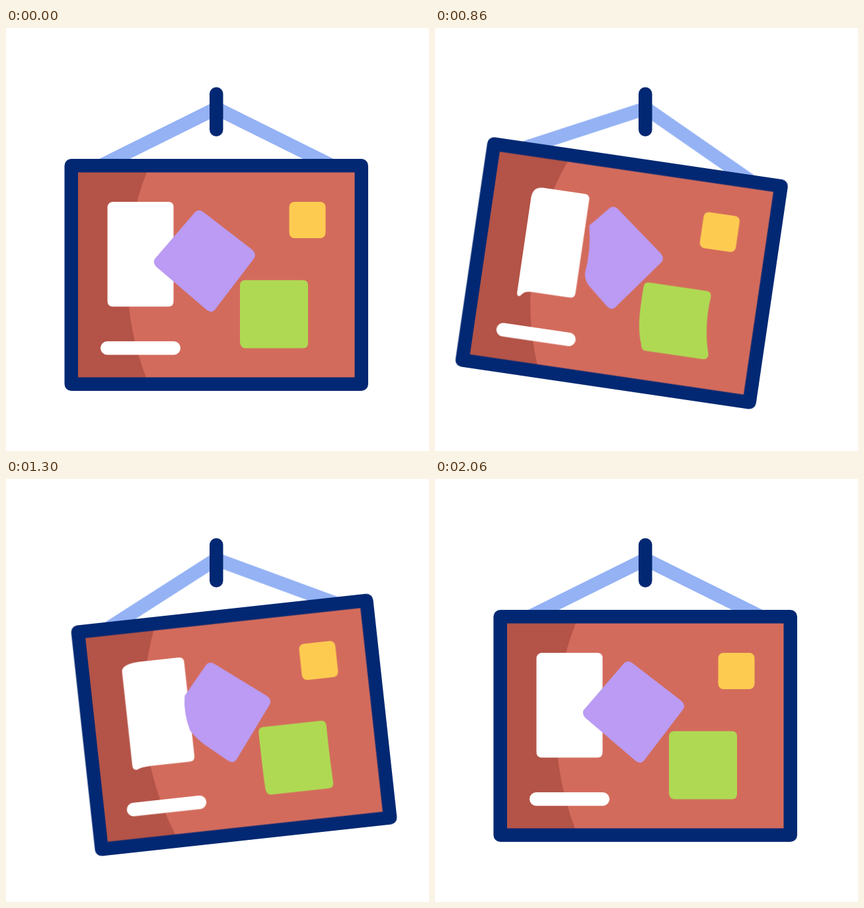
These frames come from a looping animation (640x640 px, 2.72 s). An HTML page:

```html
<!DOCTYPE html>
<html lang="en">
<head>
<meta charset="utf-8">
<title>Swinging pinboard</title>
<style>
  html, body { margin: 0; width: 100%; height: 100%; overflow: hidden; background: #fff; }
  svg { display: block; width: 100%; height: 100%; }

  #board {
    transform-origin: 318.3px 127px;
    animation: sway 2720ms infinite;
  }

  @keyframes sway {
    0%, 16.18% { transform: rotate(0deg); animation-timing-function: cubic-bezier(.333, 0, .667, 1); }
    22.83% { transform: rotate(-6.5deg); animation-timing-function: cubic-bezier(.333, 0, .333, 1); }
    35.85% { transform: rotate(10deg); animation-timing-function: cubic-bezier(.42, 0, .667, 1); }
    52.1% { transform: rotate(-10deg); animation-timing-function: cubic-bezier(.35, 0, .15, 1); }
    72.65%, 100% { transform: rotate(0deg); }
  }
</style>
</head>
<body>
<svg viewBox="0 0 640 640">
  <g id="board">
    <path d="M144 208L318.3 121.5L492.6 208" fill="none" stroke="#94b2f4" stroke-width="20.4"/>
    <rect x="98.75" y="208.25" width="439" height="330.5" fill="#d36b5c"/>
    <path d="M105 218H213A429 429 0 0 0 212 529H105Z" fill="#b45347"/>
    <rect x="98.75" y="208.25" width="439" height="330.5" fill="none"
          stroke="#022873" stroke-width="20.5" stroke-linejoin="round"/>
    <rect x="143" y="474" width="121" height="20.5" rx="10.25" fill="#fff"/>
    <rect x="428.5" y="263" width="55" height="55" rx="8" fill="#fecb51"/>
    <path id="sheet" fill="#fff"/>
    <path id="diamond" fill="#bb9bf3"/>
    <path id="square" fill="#afd953"/>
  </g>
  <rect x="308" y="89.5" width="20.5" height="74.5" rx="10.25" fill="#022873"/>
</svg>
<script>
  const LOOP = 2720;
  const times = [440, 680, 860, 1180, 1500, 1760, 2060];

  // How far each loose paper edge bends at those times
  const bend = {
    shift: [0, 2, 12.5, 6.5, 2, 5, 0],
    dip:   [0, 0, 9.5, 4.5, 2.5, 8, 0],
    round: [0, 0, 10, 20, 30, 16, 0],
    fold:  [0, 0, 1.04, 0.93, 0.17, 0.6, 0],
    skew:  [0, -3, 9, 3.5, -4.5, 3.5, 0]
  };

  const mix = (a, b, k) => a + (b - a) * k;
  const pt = (x0, y0, x1, y1, k) => mix(x0, x1, k) + ' ' + mix(y0, y1, k);

  function valueAt(track, t) {
    if (t <= times[0]) return track[0];
    const i = times.findIndex(v => v > t);
    if (i < 0) return track[track.length - 1];
    const u = (t - times[i - 1]) / (times[i] - times[i - 1]);
    return mix(track[i - 1], track[i], u * u * (3 - 2 * u));
  }

  function sheetPath(shift, dip, round) {
    const x = 153.5 + shift;
    const foot = x + 8 - dip * 0.3;
    return `M${x} ${413 + dip * 1.3}L${x} ${271 + shift}
      C${x} 267 ${x + 3.5 + round * 0.3} 263 ${x + 8 + round} 263
      H245.5Q253.5 263 253.5 271V413.5Q253.5 421.5 245.5 421.5H190
      C178 421.5 ${foot + 5} ${421.5 + dip * 0.2} ${foot} ${421.5 + dip * 0.9}
      Q${x} ${421.5 + dip * 1.1} ${x} ${413 + dip * 1.3}Z`;
  }

  function diamondPath(k) {
    const tip = 220 + 30 * k + 14 * k ** 4;
    return `M284 281Q290 273 298 278L372 335Q380 342 375 349
      L317 425Q311 433 303 426L272 399.5
      Q${pt(249.5, 380, 264, 392, k)} ${pt(227, 361, 262, 381, k)}
      Q${tip} ${mix(353, 345, k)} ${pt(228, 346, 258, 311, k)}Z`;
  }

  function squarePath(s) {
    const left = 354 + s, right = 457 + s;
    const lift = Math.min(s, 0) * 0.6;
    const low = 484.5 + lift;
    return `M362 381.5H449Q457 381.5 457 389.5
      C${457 - s * 0.25} 415 ${457 - s * 0.1} 445 ${right} ${low - 8}
      Q${right} ${low} ${right - 8} ${low}H${left + 8}
      Q${left + 1} ${low} ${left} ${low - 9}
      C${354 + s * 0.2} 455 ${354 - s * 0.1} 440 354 389.5
      Q354 381.5 362 381.5Z`;
  }

  const byId = id => document.getElementById(id);
  const [sheet, diamond, square] = ['sheet', 'diamond', 'square'].map(byId);
  let start;

  function draw(now) {
    start ??= now;
    const t = (now - start) % LOOP;
    const at = name => valueAt(bend[name], t);
    sheet.setAttribute('d', sheetPath(at('shift'), at('dip'), at('round')));
    diamond.setAttribute('d', diamondPath(at('fold')));
    square.setAttribute('d', squarePath(at('skew')));
    requestAnimationFrame(draw);
  }
  requestAnimationFrame(draw);
</script>
</body>
</html>
```
